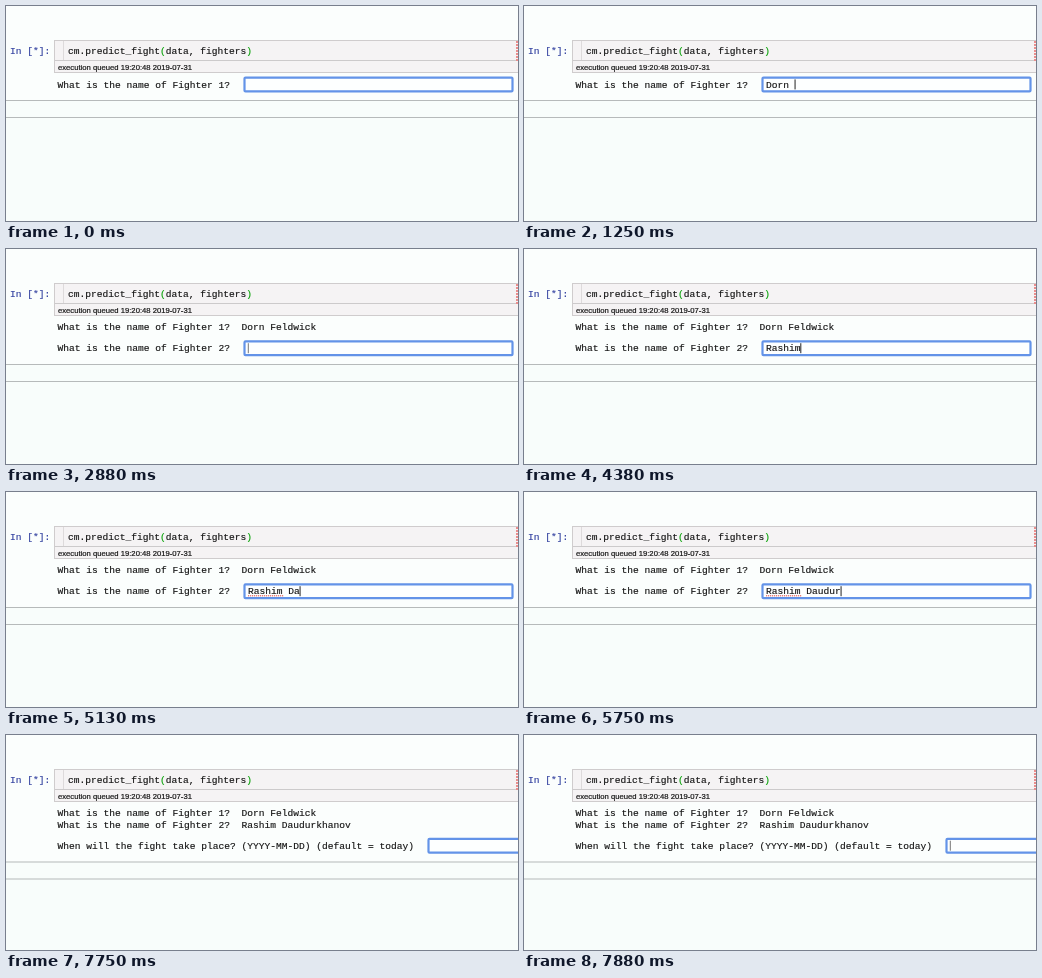
Recreate the animation shown at these times as an HTML page with a canvas. Size 512 by 215 pixels, loop 8000 ms.

```html
<!DOCTYPE html>
<html lang="en">
<head>
<meta charset="utf-8">
<title>Notebook prompt</title>
<style>
html, body { margin: 0; width: 100%; height: 100%; overflow: hidden; background: #fafefd; }
canvas { display: block; width: 512px; height: 215px; }
</style>
</head>
<body>
<canvas id="stage"></canvas>
<script>
const W = 512, H = 215, LOOP = 8000;
const SIZE = 9.585, PITCH = SIZE * 0.6;
const MONO = SIZE + 'px "Liberation Mono", "Courier New", monospace';
const SANS = '7.68px "Liberation Sans", Arial, sans-serif';
const ASK1 = "What is the name of Fighter 1?";
const ASK2 = "What is the name of Fighter 2?";
const ASK3 = "When will the fight take place? (YYYY-MM-DD) (default = today)";
const INK = "#151515";

// Each burst is typed evenly from its first letter to its last.
const NAME1 = [
  { text: "Dorn ", from: 750, to: 1250 },
  { text: "Feldwick", from: 1500, to: 2500 },
];
const NAME2 = [
  { text: "Ra", from: 3250, to: 3500 },
  { text: "shim", from: 4000, to: 4380 },
  { text: " Daudur", from: 4630, to: 5750 },
  { text: "khanov", from: 6000, to: 7250 },
];

const canvas = document.getElementById("stage");
const scale = window.devicePixelRatio || 1;
canvas.width = W * scale;
canvas.height = H * scale;
const ctx = canvas.getContext("2d");

function rect(x, y, w, h, color) {
  ctx.fillStyle = color;
  ctx.fillRect(x, y, w, h);
}

function write(text, x, y, color = INK, font = MONO, weight = 0.15) {
  ctx.font = font;
  ctx.fillStyle = ctx.strokeStyle = color;
  ctx.lineWidth = weight;
  ctx.fillText(text, x, y);
  ctx.strokeText(text, x, y);
}

function typed(bursts, t) {
  return bursts.map(({ text, from, to }) => {
    if (t < from) return "";
    const progress = Math.min(1, (t - from) / (to - from));
    return text.slice(0, 1 + Math.floor(progress * (text.length - 1)));
  }).join("");
}

function codeCell() {
  write("In [*]:", 4, 47.5, "#303f9f");
  rect(48, 34, W, 33, "#cfcccd");
  rect(49, 35, W, 31, "#f5f3f4");
  rect(57, 35, 1, 19, "#dddadb");
  rect(49, 54, W, 1, "#cccacb");
  for (let y = 35; y < 54; y += 3) rect(510, y, 2, 2, "#ea8d8d");

  let x = 62;
  for (const part of "cm.predict_fight(data, fighters)".split(/([()])/)) {
    write(part, x, 47.5, /[()]/.test(part) ? "#00a000" : INK);
    x += part.length * PITCH;
  }
  write("execution queued 19:20:48 2019-07-31", 52, 63.6, INK, SANS, 0.2);
}

function field(x, y, text, caret) {
  ctx.fillStyle = "#fdffff";
  ctx.strokeStyle = "#6393e8";
  ctx.lineWidth = 2.2;
  ctx.beginPath();
  ctx.roundRect(x + 1, y + 1, 268, 13.8, 1);
  ctx.fill();
  ctx.stroke();
  write(text, x + 4.5, y + 10.9);
  if (caret) rect(x + 4.3 + text.length * PITCH, y + 2.8, 1, 10, text ? "#222" : "#777");
}

function misspelled(x, y, letters) {
  for (let i = 0; i < letters * PITCH; i += 2) rect(x + i, y, 1.2, 1, "#e0443c");
}

function footer(y) {
  rect(0, y, W, H, "#f8fdfb");
  rect(0, y, W, 1, "#b6baba");
  rect(0, y + 17, W, 1, "#b6baba");
}

function draw(t) {
  ctx.setTransform(scale, 0, 0, scale, 0, 0);
  rect(0, 0, W, H, "#fbfefd");
  codeCell();
  const name1 = typed(NAME1, t), name2 = typed(NAME2, t);
  if (t < 2880) {
    footer(94);
    write(ASK1, 51.6, 81.5);
    field(237.5, 70.6, name1, t >= 380);
    return;
  }
  write(ASK1 + "  " + name1, 51.6, 81);
  if (t < 7750) {
    footer(115);
    write(ASK2, 51.6, 102.3);
    field(237.5, 91.4, name2, true);
    if (name2.includes(" ")) misspelled(242, 103.3, name2.indexOf(" "));
  } else {
    footer(126.5);
    write(ASK2 + "  " + name2, 51.6, 92.8);
    write(ASK3, 51.6, 114);
    field(421.5, 102.9, "", t >= 7880);
  }
}

const start = performance.now();
function tick() {
  draw((performance.now() - start) % LOOP);
  requestAnimationFrame(tick);
}
draw(0);
requestAnimationFrame(tick);
</script>
</body>
</html>
```
